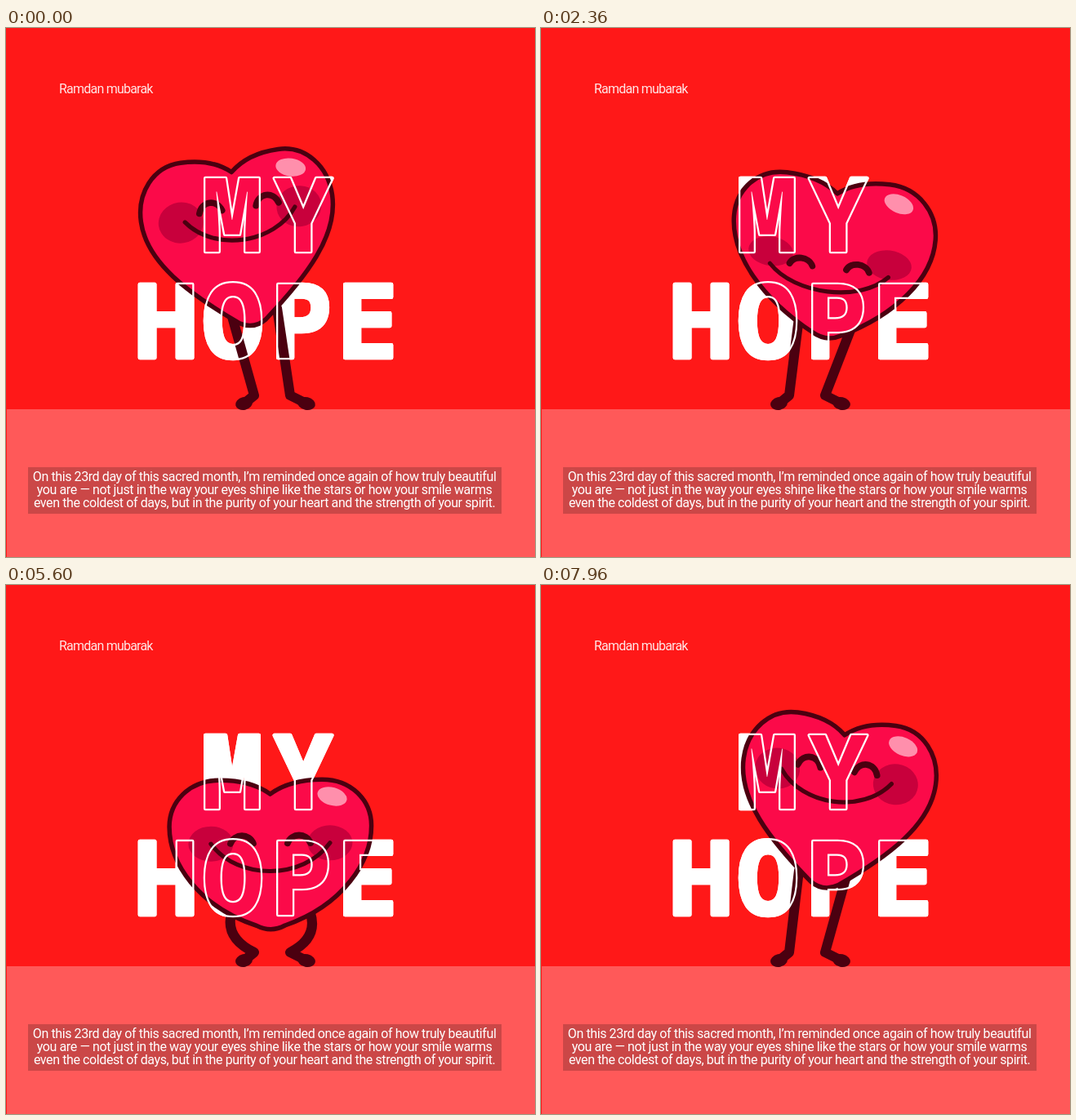
Recreate the animation shown at these times as an HTML page. Size 648x648 px, loop 8 s.

```html
<!DOCTYPE html>
<html lang="en">
<head>
<meta charset="utf-8">
<title>Heart dance</title>
<style>
  html, body { margin: 0; width: 100%; height: 100%; overflow: hidden; background: #ff1818; }
  svg { display: block; width: 100vw; height: 100vh; }
  .headline { font: 600 126px "Noto Sans Mono", monospace; text-anchor: middle; stroke-width: 4.6; stroke-linejoin: round; }
  .solid { fill: #fff; stroke: #fff; }
  .rim { fill: #000; stroke: #fff; paint-order: stroke; }
  .small { font: 400 16px Roboto, sans-serif; fill: #fff; }
  .greeting { letter-spacing: -.78px; fill: #ffe6e6; }
  .caption { letter-spacing: -.4px; text-anchor: middle; }
  .ink { fill: none; stroke: #4b0010; stroke-linecap: round; stroke-linejoin: round; }
  .foot { fill: #4b0010; }
  .cheek { fill: #c8003c; }
</style>
</head>
<body>
<svg viewBox="0 0 648 648">
  <defs>
    <g id="words">
      <text x="277 364" y="273.5">MY</text>
      <text x="196 278 361 443" y="404">HOPE</text>
    </g>
    <mask id="outline" maskUnits="userSpaceOnUse" x="0" y="0" width="648" height="648">
      <use href="#words" class="headline rim"/>
    </mask>
  </defs>

  <rect width="648" height="648" fill="#ff1818"/>
  <rect x="1" y="467" width="647" height="181" fill="#ff5959"/>
  <text class="small greeting" x="65" y="79.5">Ramdan mubarak</text>
  <rect x="27" y="538" width="580" height="57" fill="#cb4747"/>
  <g class="small caption">
    <text x="316.6" y="555">On this 23rd day of this sacred month, I’m reminded once again of how truly beautiful</text>
    <text x="316.6" y="571">you are — not just in the way your eyes shine like the stars or how your smile warms</text>
    <text x="316.6" y="587">even the coldest of days, but in the purity of your heart and the strength of your spirit.</text>
  </g>

  <use href="#words" class="headline solid"/>

  <path id="legL" class="ink" stroke-width="12"/>
  <path id="legR" class="ink" stroke-width="12"/>
  <ellipse class="foot" cx="291.5" cy="460" rx="10.5" ry="7.8" transform="rotate(-12 291.5 460)"/>
  <ellipse class="foot" cx="368" cy="460" rx="11" ry="7.8" transform="rotate(12 368 460)"/>

  <g id="heart">
    <path id="body" class="ink" style="fill:#fb0a49" stroke-width="5.5"/>
    <ellipse id="shine" rx="18.5" ry="11" fill="#ff8fac"/>
    <g id="face">
      <ellipse id="cheekL" class="cheek"/>
      <ellipse id="cheekR" class="cheek"/>
      <path id="smile" class="ink" stroke-width="5.2"/>
      <path id="eyes" class="ink" stroke-width="7.8"/>
    </g>
  </g>

  <rect width="648" height="648" fill="#fff" mask="url(#outline)"/>
</svg>

<script>
  // The screen refreshes every TICK ms; the drawing advances every HOLD ms
  const LOOP = 8000, TICK = 40, HOLD = 48, SWING = 18;
  const $ = id => document.getElementById(id);
  const set = (id, attrs) => { for (const k in attrs) $(id).setAttribute(k, attrs[k]); };

  // Key poses along one swing from left to right, in drawings
  const TIMES = [0, 3, 8, 13];
  const EVEN = {
    centre: [326, 326, 328, 326],
    tipY: [367, 373.5, 424.5, 382.5],
    halfW: [121, 121.5, 126.5, 127],
    height: [215, 214, 188.5, 201.5],
    cheekY: [-139.5, -140, -108, -100.5],
    cheekRy: [25, 25, 21.5, 18],
    smileY: [0, 0, 0, 15],
    smileW: [68, 68, 73, 73],
    smileD: [31, 31, 34, 26],
    eyeY: [-8, -8, 0, 12],
    hip: [29, 30, 48, 34],
    bend: [0, 0, 23, 0]
  };
  // These change sign with the swing direction
  const ODD = {
    tipX: [-23, -20, -3.5, 23.5],
    lean: [-8, -7.8, -.3, 4.3],
    tilt: [-8, -7.8, -.5, 6.8],
    faceX: [3, 3, 0, -3]
  };

  function spline(keys, at, flip) {
    const time = i => TIMES[(i + 4) % 4] + SWING * Math.floor(i / 4);
    const value = i => keys[(i + 4) % 4] * (i < 0 || i > 3 ? flip : 1);
    const slope = i => (value(i + 1) - value(i - 1)) / (time(i + 1) - time(i - 1));
    let i = 3;
    while (TIMES[i] > at) i--;
    const h = time(i + 1) - time(i), s = (at - time(i)) / h, r = 1 - s;
    return r * r * (1 + 2 * s) * value(i) + s * s * (3 - 2 * s) * value(i + 1)
      + h * s * r * (r * slope(i) - s * slope(i + 1));
  }

  function poseAt(drawing) {
    const at = drawing % SWING, pose = {};
    const side = Math.floor(drawing / SWING) % 2 ? -1 : 1;
    for (const k in EVEN) pose[k] = spline(EVEN[k], at, 1);
    for (const k in ODD) pose[k] = side * spline(ODD[k], at, -1);
    return pose;
  }

  function heartPath(halfW, height) {
    const a = halfW - 2.75, h = height - 5.5, full = (215 - height) / 26;
    const pt = (x, y) => `${(x * a).toFixed(2)} ${(y * h - 2.75).toFixed(2)} `;
    const low = [.62 + .1 * full, -.24 + .08 * full];
    return 'M' + pt(0, -.905)
      + 'C' + pt(.15, -.98) + pt(.33, -1) + pt(.51, -1)
      + 'C' + pt(.8, -1) + pt(1, -.86) + pt(1, -.69)
      + 'C' + pt(1, -.45) + pt(...low) + pt(.14, -.025)
      + 'Q' + pt(0, .025) + pt(-.14, -.025)
      + 'C' + pt(-low[0], low[1]) + pt(-1, -.45) + pt(-1, -.69)
      + 'C' + pt(-1, -.86) + pt(-.8, -1) + pt(-.51, -1)
      + 'C' + pt(-.33, -1) + pt(-.15, -.98) + pt(0, -.905) + 'Z';
  }

  function legPath(hipX, hipY, ankle, toe, bend) {
    const kneeX = (hipX + ankle) / 2 + bend, kneeY = (hipY + 450) / 2 + Math.abs(bend) * .3;
    return `M${hipX} ${hipY}Q${kneeX} ${kneeY} ${ankle} 450L${toe} 459`;
  }

  function draw(drawing) {
    const p = poseAt(drawing), rad = Math.PI / 180;
    const x = p.centre + p.tipX, y = p.tipY, hipY = y - 24;
    const lean = p.lean * rad, tilt = p.tilt * rad;

    set('legL', { d: legPath(x - p.hip, hipY, 304, 293, -p.bend) });
    set('legR', { d: legPath(x + p.hip, hipY, 348, 366, p.bend) });
    set('heart', { transform: `matrix(${[Math.cos(tilt), Math.sin(tilt), -Math.sin(lean), Math.cos(lean), x, y]})` });
    set('body', { d: heartPath(p.halfW, p.height) });
    set('shine', { transform: `translate(${p.halfW * .6} ${-p.height * .875}) rotate(16)` });

    set('face', { transform: `translate(${p.faceX} ${p.cheekY})` });
    const cheek = { rx: 27.5, ry: p.cheekRy };
    set('cheekL', { cx: -73, ...cheek });
    set('cheekR', { cx: 73, ...cheek });

    const w = p.smileW, dip = p.smileY + p.smileD * 4 / 3;
    set('smile', { d: `M${-w} ${p.smileY}C${-w * .55} ${dip} ${w * .55} ${dip} ${w} ${p.smileY}` });
    const arch = p.eyeY - p.cheekRy * .6;
    const eye = cx => `M${cx - 14} ${p.eyeY}C${cx - 9} ${arch} ${cx + 9} ${arch} ${cx + 14} ${p.eyeY}`;
    set('eyes', { d: eye(-35) + eye(35) });
  }

  const start = performance.now();
  function tick() {
    const ms = (performance.now() - start) % LOOP;
    const shown = Math.floor(ms / TICK) * TICK;
    draw(Math.max(0, Math.ceil(shown / HOLD) - 1));
    requestAnimationFrame(tick);
  }
  tick();
</script>
</body>
</html>
```
